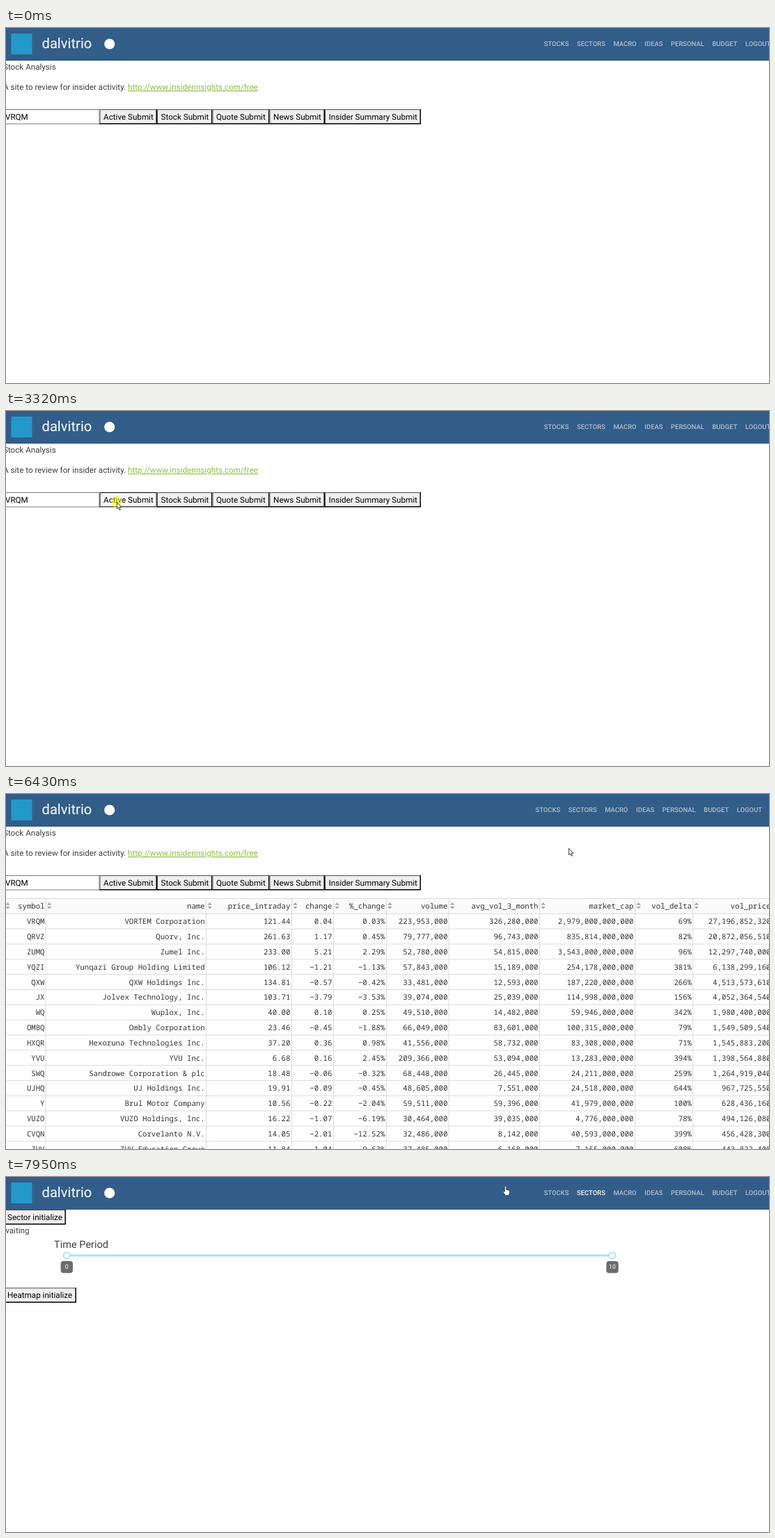
Animation of 1096 by 511 pixels, one loop 8 s. Source, as an HTML page:

```html
<!DOCTYPE html>
<html lang="en">
<head>
<meta charset="utf-8">
<title>Stock dashboard</title>
<style>
  html, body { margin: 0; width: 100%; height: 100%; overflow: hidden; background: #fff; }
  svg { display: block; width: 100vw; height: 100vh; }
  text { font: 11.65px Roboto, sans-serif; fill: #3e3f3a; white-space: pre; text-rendering: geometricPrecision; }
  .ink { fill: #000; }
  .link { fill: #8dbf45; text-decoration: underline; }
  .brand { font-size: 20.2px; fill: #fff; }
  .nav { font-size: 9.47px; font-weight: 500; fill: #fff; fill-opacity: .6; }
  .nav.on { fill-opacity: .95; }
  .big { font-size: 14.56px; }
  .tip { font-size: 8.74px; fill: #fff; text-anchor: middle; }
  .cell { font: 10.68px "Noto Sans Mono", monospace; fill: #333; text-anchor: end; }
</style>
</head>
<body>
<svg id="stage" viewBox="0 0 1096 511" preserveAspectRatio="none"></svg>
<script>
const LOOP = 8000;
const NS = "http://www.w3.org/2000/svg";
const stage = document.getElementById("stage");

function add(parent, tag, attrs = {}, content = "") {
  const node = document.createElementNS(NS, tag);
  for (const key in attrs) node.setAttribute(key, attrs[key]);
  node.textContent = content;
  parent.appendChild(node);
  return node;
}
const group = parent => add(parent, "g");
const label = (parent, x, y, content, cls = "") => add(parent, "text", { x, y, class: cls }, content);
const box = (parent, x, y, width, height, fill, rx = 0) =>
  add(parent, "rect", { x, y, width, height, fill, rx });
const path = (parent, d, attrs) => add(parent, "path", { d, ...attrs });
const show = (node, on) => node.setAttribute("visibility", on ? "visible" : "hidden");

function button(parent, x, y, right, content, textX = x + 5.6) {
  const g = group(parent), w = right - x, h = 21.6;
  const face = box(g, x, y, w, h, "#efefef");
  const lit = path(g, `M${x + .5} ${y + h}V${y + .5}H${right}`, { fill: "none", "stroke-width": 1 });
  const shade = path(g, `M${x} ${y + h - .8}H${right - .8}V${y}`, { fill: "none", "stroke-width": 1.5 });
  label(g, textX, y + 14.8, content, "ink");
  g.press = down => {
    face.setAttribute("fill", down ? "#f5f5f5" : "#efefef");
    lit.setAttribute("stroke", down ? "#000" : "#4c4c4c");
    shade.setAttribute("stroke", down ? "#4c4c4c" : "#000");
  };
  g.press(false);
  return g;
}

// Stocks page
const stocks = group(stage);
label(stocks, -4, 60, "Stock Analysis");
label(stocks, -4, 89, "A site to review for insider activity.");
label(stocks, 175, 89, "http://www.insiderinsights.com/free", "link");
add(stocks, "rect", { x: -8, y: 117.5, width: 142, height: 20.5, fill: "#fff", stroke: "#767676" });
label(stocks, -1, 131.8, "VRQM", "ink");
const edges = [134.5, 217, 296.5, 378.5, 458, 596];
const buttons = ["Active", "Stock", "Quote", "News", "Insider Summary"].map((name, i) =>
  button(stocks, edges[i], 117, edges[i + 1], name + " Submit"));

// Symbol, name, price, change, volume and average in thousands, cap in millions
const rows = `VRQM|VORTEM Corporation|121.44|0.04|223953|326280|2979000
QRVZ|Quorv, Inc.|261.63|1.17|79777|96743|835814
ZUMQ|Zumel Inc.|233.00|5.21|52780|54815|3543000
YQZI|Yunqazi Group Holding Limited|106.12|-1.21|57843|15189|254178
QXW|QXW Holdings Inc.|134.81|-0.57|33481|12593|187220
JX|Jolvex Technology, Inc.|103.71|-3.79|39074|25039|114998
WQ|Wuplox, Inc.|40.00|0.10|49510|14482|59946
OMBQ|Ombly Corporation|23.46|-0.45|66049|83601|100315
HXQR|Hexoruna Technologies Inc.|37.20|0.36|41556|58732|83308
YVU|YVU Inc.|6.68|0.16|209366|53094|13283
SWQ|Sandrowe Corporation & plc|18.48|-0.06|68448|26445|24211
UJHQ|UJ Holdings Inc.|19.91|-0.09|48605|7551|24518
Y|Brul Motor Company|10.56|-0.22|59511|59396|41979
VUZO|VUZO Holdings, Inc.|16.22|-1.07|30464|39035|4776
CVQN|Corvelanto N.V.|14.05|-2.01|32486|8142|40593
ZUV|ZUV Education Group|11.84|1.04|37485|6168|7155`.split("\n").map(line => line.split("|"));

const heads = ["symbol", "name", "price_intraday", "change", "%_change", "volume",
  "avg_vol_3_month", "market_cap", "vol_delta", "vol_price"];
const rights = [55.5, 285.7, 408.3, 468.3, 544.3, 634.3, 764.5, 901.5, 985, 1098.5];
const lines = [57, 287.5, 410.5, 470.5, 546.3, 636, 766.5, 903.5, 986.7];
const TOP = 150.5, ROW = 21.83;
const whole = n => Math.round(n).toLocaleString("en-US");
const minus = s => s.replace("-", "\u2212");

function cells([symbol, name, price, change, volume, average, cap]) {
  return [symbol, name, price, minus(change),
    minus((100 * change / (price - change)).toFixed(2)) + "%",
    whole(volume * 1e3), whole(average * 1e3), whole(cap * 1e6),
    Math.round(100 * volume / average) + "%", whole(price * volume * 1e3)];
}

const table = group(stage);
box(table, 0, TOP, 1096, ROW, "#fafafa");
const grid = { stroke: "#d3d3d3", "stroke-width": .8, fill: "none" };
for (let i = 0; i <= rows.length; i++) path(table, `M0 ${TOP + i * ROW}H1096`, grid);
for (const x of lines) path(table, `M${x} ${TOP}V511`, grid);
for (const x of [-2.5, ...lines])
  path(table, `M${x + 1.8} 159.8h6.6l-3.3 -3.6zM${x + 1.8} 162h6.6l-3.3 3.6z`, { fill: "#a5a5a5" });
[heads, ...rows.map(cells)].forEach((row, r) =>
  row.forEach((value, c) => label(table, rights[c], TOP + r * ROW + 14.9, value, "cell")));

// Sectors page
const sectors = group(stage);
button(sectors, -4, 47, 86, "Sector initialize", 2);
const status = label(sectors, -4, 81.4, "none");
label(sectors, 69, 102, "Time Period", "big");
const heatmap = button(sectors, -4, 131, 101, "Heatmap initialize", 2);
const slider = group(sectors);
box(slider, 87, 111.4, 784, 3, "#abe2fb");
for (const [x, value] of [[87.3, 0], [871, 10]]) {
  add(slider, "circle", { cx: x, cy: 113, r: 4.6, fill: "#fff", stroke: "#96dbfa", "stroke-width": 1.5 });
  box(slider, x - 8.7, 121, 17.4, 17.3, "#6c6c6c", 4);
  label(slider, x, 132.3, value, "tip");
}

// Navigation bar
box(stage, 0, 0, 1096, 47, "#325d88");
box(stage, 7.5, 8, 30, 30, "#2398cb");
label(stage, 51.5, 29, "dalvitrio", "brand");
add(stage, "circle", { cx: 148.7, cy: 23, r: 7.6, fill: "#fff" });
const nav = group(stage);
const navX = [772.7, 820, 872.4, 917.3, 955, 1014.4, 1062];
const navLinks = ["STOCKS", "SECTORS", "MACRO", "IDEAS", "PERSONAL", "BUDGET", "LOGOUT"]
  .map((name, i) => label(nav, navX[i], 25.8, name, "nav"));

// Pointer
const pointer = group(stage);
const halo = add(pointer, "circle", { r: 8.5, fill: "#ff0", "fill-opacity": .47 });
const arrow = path(pointer, "M.4 .4V9.8L2.5 7.9L4 11.5L5.5 10.8L4 7.3H6.8Z",
  { fill: "#fff", stroke: "#000", "stroke-width": .75 });
const hand = path(pointer,
  "M-1.2 1.3a1.2 1.2 0 0 1 2.4 0V5.3L4.6 6q1.8.4 1.6 2.1L5.6 11l-.8 2.4H-.2L-3.2 9q-.8-1.4.4-1.8l1.6 1.1z",
  { fill: "#fff", stroke: "#222", "stroke-width": .75 });

// Each move: first step, last step, number of steps, end point
const moves = [
  [390, 690, 4, 686, 305],
  [1290, 1510, 3, 372, 188],
  [1910, 1910, 1, 260, 140],
  [2010, 2110, 2, 159, 119],
  [2310, 2410, 2, 162, 133],
  [2510, 2510, 1, 159, 131],
  [3820, 4120, 4, 295, 261],
  [5930, 5930, 1, 494, 189],
  [6080, 6130, 2, 801, 102],
  [6430, 6950, 6, 824.5, 23],
  [7850, 7950, 2, 717.5, 13]
];
const ease = p => p * (2 - p);

function pointerAt(t) {
  let x = 1290, y = 646;
  for (const [start, end, steps, toX, toY] of moves) {
    if (t < start) break;
    const gap = (end - start) / Math.max(1, steps - 1);
    const step = t >= end ? steps : 1 + Math.floor((t - start) / gap);
    const p = ease(step / steps);
    x += (toX - x) * p;
    y += (toY - y) * p;
  }
  return [x, y];
}

const within = (t, from, to) => t >= from && t < to;

function draw(t) {
  const hasTable = within(t, 4920, 7550), onSectors = t >= 7550, loaded = t >= 7750;
  show(stocks, !onSectors);
  show(table, hasTable);
  show(sectors, onSectors);
  show(slider, onSectors && loaded);
  status.textContent = loaded ? "waiting" : "none";
  heatmap.setAttribute("transform", `translate(0 ${loaded ? 28.4 : 0})`);
  buttons[0].press(within(t, 3320, 3430));

  const [x, y] = pointerAt(t);
  const overLink = y < 34;
  nav.setAttribute("transform", `translate(${hasTable ? -12.2 : 0} 0)`);
  navLinks[1].classList.toggle("on", overLink);
  pointer.setAttribute("transform", `translate(${x} ${y})`);
  show(pointer, t >= 390);
  show(arrow, t >= 390 && !overLink);
  show(hand, t >= 390 && overLink);
  show(halo, within(t, 3320, 3530) || within(t, 7150, 7350));
}

let origin;
function tick(now) {
  origin ??= now;
  draw((now - origin) % LOOP);
  requestAnimationFrame(tick);
}
draw(0);
requestAnimationFrame(tick);
</script>
</body>
</html>
```
